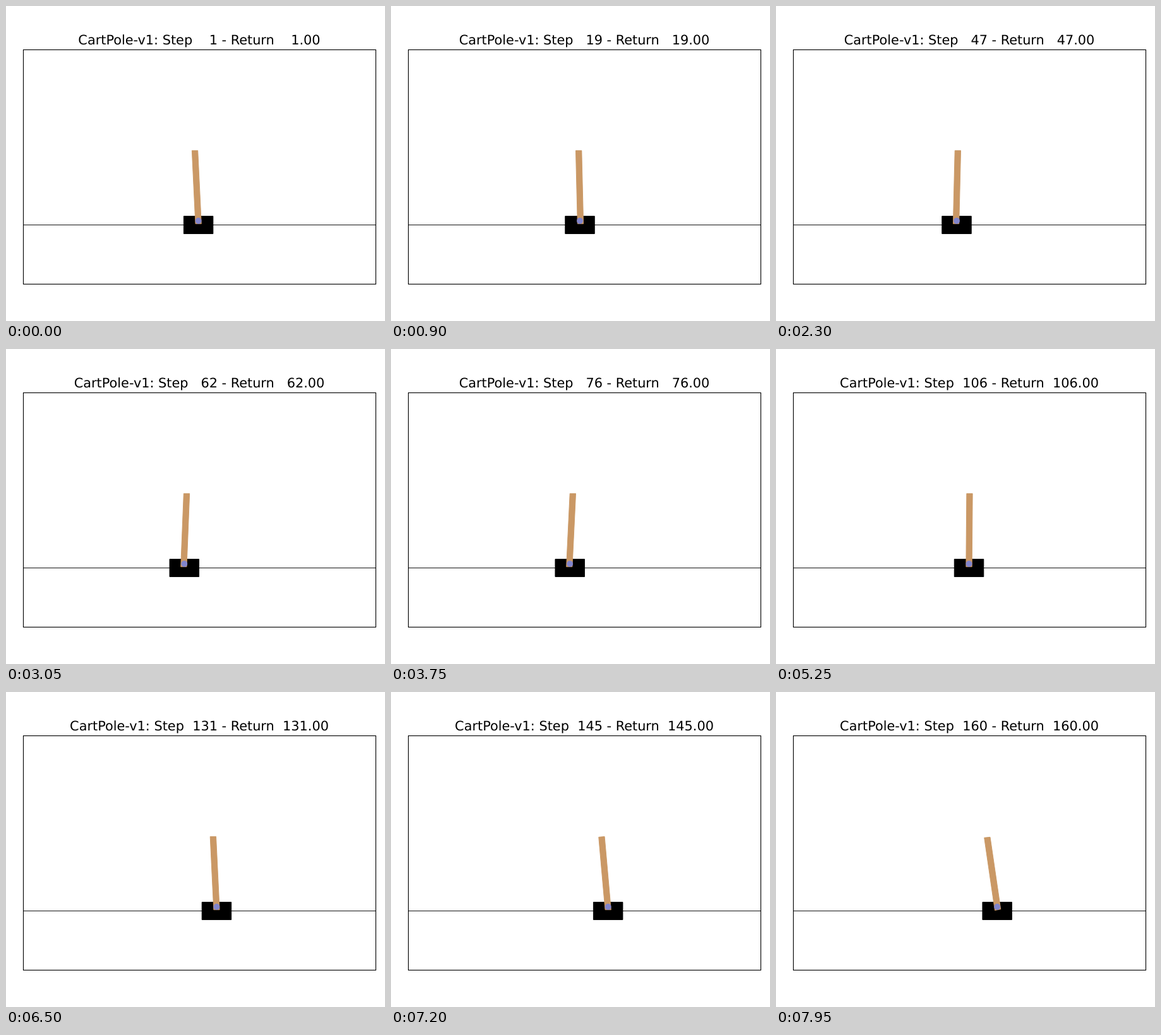
An HTML page that plays this animation: 600 by 500 pixels, repeating every 8000 ms.

```html
<!DOCTYPE html>
<html lang="en">
<head>
<meta charset="utf-8">
<title>CartPole</title>
<style>
  html, body { margin: 0; width: 100%; height: 100%; overflow: hidden; background: #fff; }
  svg { display: block; }
  text { font: 20.83px "DejaVu Sans", sans-serif; text-anchor: middle; white-space: pre; text-rendering: geometricPrecision; }
  #pole { fill: #ca9865; stroke: #ca9865; }
</style>
</head>
<body>
<svg width="600" height="500" viewBox="0 0 600 500">
  <text id="title" x="306" y="61"></text>
  <!-- a 600 by 400 scene whose whole numbers are pixel centres -->
  <g transform="translate(27 69) scale(.93) translate(.5 .5)">
    <path d="M0 299H600" stroke="#000"/>
    <polygon id="cart" stroke="#000"/>
    <polygon id="pole"/>
    <circle id="axle" cy="292" r="5.3" fill="#8184cb"/>
  </g>
  <rect x="27.5" y="69.5" width="558" height="372" fill="none" stroke="#000" stroke-width="1.11"/>
</svg>
<script>
const STEP_MS = 50, STEPS = 160;
const CART_Y = 100, AXLE_Y = 107.5, TOP_ROW = 399;

// Key poses, joined by smooth curves
const poses = [
  { step: 1, x: 298.3, tilt: -0.048 },
  { step: 19, x: 292.95, tilt: -0.023 },
  { step: 47, x: 278.05, tilt: 0.021 },
  { step: 76, x: 275.1, tilt: 0.046 },
  { step: 106, x: 299.5, tilt: 0.008 },
  { step: 131, x: 329.4, tilt: -0.049 },
  { step: 160, x: 347.5, tilt: -0.142 }
];
const last = poses.length - 1;

const secant = (key, i, j) => (poses[j][key] - poses[i][key]) / (poses[j].step - poses[i].step);

function slope(key, i) {
  if (i === 0) return 2 * secant(key, 0, 1) - slope(key, 1);
  if (i === last) return 2 * secant(key, last - 1, last) - slope(key, last - 1);
  return secant(key, i - 1, i + 1);
}

function sample(key, step) {
  const i = poses.findIndex((pose, n) => n === last - 1 || step < poses[n + 1].step);
  const from = poses[i], to = poses[i + 1], span = to.step - from.step;
  const u = (step - from.step) / span, w = 1 - u;
  return from[key] * w * w * (1 + 2 * u) + to[key] * u * u * (3 - 2 * u)
    + span * u * w * (slope(key, i) * w - slope(key, i + 1) * u);
}

// A box around a pivot, tilted, with its corners snapped to whole pixels
function boxPoints(pivotX, pivotY, left, right, bottom, top, tilt) {
  const sin = Math.sin(tilt), cos = Math.cos(tilt);
  return [[left, bottom], [left, top], [right, top], [right, bottom]].map(([x, y]) => [
    Math.floor(pivotX + x * cos + y * sin),
    TOP_ROW - Math.floor(pivotY + y * cos - x * sin)
  ]).join(" ");
}

const [title, cart, pole, axle] =
  ["title", "cart", "pole", "axle"].map(id => document.getElementById(id));

function draw(time) {
  const step = Math.floor(time / STEP_MS) % STEPS + 1;
  const x = sample("x", step);
  title.textContent =
    `CartPole-v1: Step ${String(step).padStart(4)} - Return ${step.toFixed(2).padStart(7)}`;
  cart.setAttribute("points", boxPoints(x, CART_Y, -25, 25, -15, 15, 0));
  pole.setAttribute("points", boxPoints(x, AXLE_Y, -5, 5, -5, 120, sample("tilt", step)));
  axle.setAttribute("cx", Math.floor(x));
}

const start = performance.now();
function tick() {
  draw(performance.now() - start);
  requestAnimationFrame(tick);
}
tick();
</script>
</body>
</html>
```
